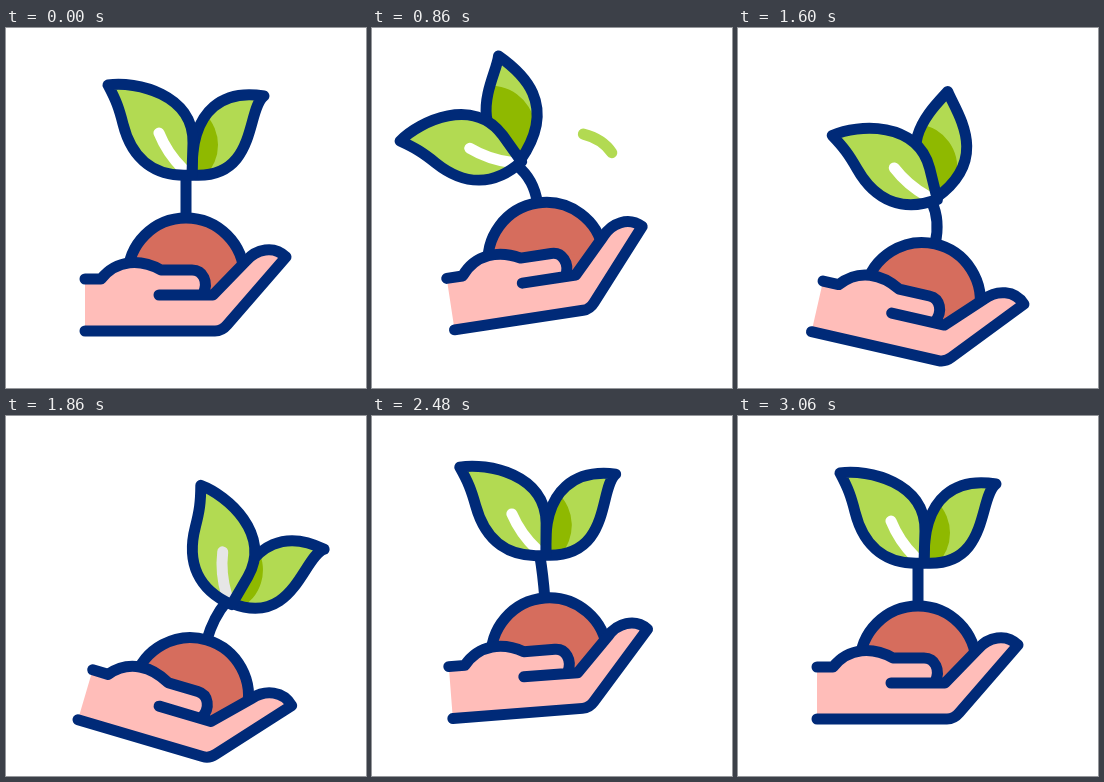
Animation of 360 by 360 pixels, one loop 3600 ms. Source, as an HTML page:

```html
<!DOCTYPE html>
<html lang="en">
<head>
<meta charset="utf-8">
<title>Sprout in hand</title>
<style>
  html, body { margin: 0; width: 100%; height: 100%; overflow: hidden; background: #fff; }
  svg { display: block; width: 100vw; height: 100vh; }
  .line { fill: none; stroke: #002a78; stroke-width: 11; stroke-linecap: round; stroke-linejoin: round; }
  .glint { fill: none; stroke-width: 11; stroke-linecap: round; }
</style>
</head>
<body>
<svg viewBox="0 0 360 360">
  <defs>
    <path id="leftLeaf" d="M102 57C130 53 188 66 187 115L186 147C150 150 126 132 117 96C113 80 110 72 102 57Z"/>
    <path id="rightLeaf"/>
    <clipPath id="inLeft"><use href="#leftLeaf"/></clipPath>
    <clipPath id="inRight"><use href="#rightLeaf"/></clipPath>
  </defs>

  <path id="spark" class="glint" stroke="#b2da52" d="M-17 1Q2 -5 17 2"/>

  <path id="stem" class="line"/>
  <g id="right">
    <use href="#rightLeaf" fill="#b2da52"/>
    <g clip-path="url(#inRight)"><circle id="shade" fill="#8fb900"/></g>
    <use href="#rightLeaf" class="line"/>
  </g>
  <g id="left">
    <use href="#leftLeaf" fill="#b2da52"/>
    <g clip-path="url(#inLeft)"><path id="glint" class="glint" d="M153 105Q161 125 177 141"/></g>
    <use href="#leftLeaf" class="line"/>
  </g>

  <g id="hand">
    <path class="line" d="M122 248A58 58 0 0 1 238 248" style="fill:#d66d5d"/>
    <path fill="#d66d5d" d="M128 246H234L207 270H150Z"/>
    <path fill="#ffbdb9" d="M79 251H95C111 231 135 231 155 242H186C197 242 201 252 197 267H207L240 233C250 221 268 217 280 229L221 297Q216 303 209 303H79Z"/>
    <path class="line" d="M79 251H95C111 231 135 231 155 242H186C197 242 203 254 197 266M153 267H207L240 233C250 221 268 217 280 229L221 297Q216 303 209 303H79"/>
  </g>
</svg>
<script>
const LOOP = 3600;
const PIVOT = { x: 73, y: 279 };
const BASE = { x: 180, y: 190 };
const STEM = 42;

// Each track: [time, angle] pairs, eased between neighbours.
const tracks = {
  hand:  [[400, 0], [1000, -10], [1800, 17], [2440, -4.5], [3060, 0]],
  stem:  [[400, 0], [1180, -45], [2000, 33], [2580, -10], [3060, 0]],
  left:  [[400, 0], [1220, -63], [2020, 39], [2580, -5], [3060, 0]],
  right: [[400, 0], [1220, -91], [2045, 33], [2580, -5], [3060, 0]]
};

// Right leaf: end points and the curve handles of both edges.
const ROOT = [186, 147], TIP = [258, 68];
const UPPER = [[222, 62], [184, 76]];
const LOWER = [[240, 80], [252, 152]];

const el = id => document.getElementById(id);
const set = (id, attrs) => {
  for (const k in attrs) el(id).setAttribute(k, attrs[k]);
};
const clamp = (v, lo, hi) => Math.min(hi, Math.max(lo, v));
const ease = u => u * u * (3 - 2 * u);

function sample(keys, t) {
  let v = keys[0][1];
  for (let i = 1; i < keys.length; i++) {
    const [t0, a] = keys[i - 1], [t1, b] = keys[i];
    if (t >= t0) v = a + (b - a) * ease(clamp((t - t0) / (t1 - t0), 0, 1));
  }
  return v;
}

function turn(x, y, deg) {
  const r = deg * Math.PI / 180, c = Math.cos(r), s = Math.sin(r);
  return { x: x * c - y * s, y: x * s + y * c };
}

// Mirrors a point across the line from the leaf's root to its tip.
function mirror([x, y]) {
  const ax = TIP[0] - ROOT[0], ay = TIP[1] - ROOT[1];
  const k = 2 * ((x - ROOT[0]) * ax + (y - ROOT[1]) * ay) / (ax * ax + ay * ay);
  return [2 * ROOT[0] - x + k * ax, 2 * ROOT[1] - y + k * ay];
}

// flip 0 is the resting leaf, 1 its mirror image.
function leafPath(flip) {
  const blend = (from, to) => from.map((p, i) => {
    const q = mirror(to[i]);
    return p.map((v, j) => v + (q[j] - v) * flip);
  });
  const [u1, u2] = blend(UPPER, LOWER);
  const [l1, l2] = blend(LOWER, UPPER);
  return `M${TIP}C${u1} ${u2} ${ROOT}C${l2} ${l1} ${TIP}Z`;
}

function draw(t) {
  const hand = sample(tracks.hand, t);
  const left = sample(tracks.left, t);
  const right = sample(tracks.right, t);

  const arm = turn(BASE.x - PIVOT.x, BASE.y - PIVOT.y, hand);
  const root = { x: PIVOT.x + arm.x, y: PIVOT.y + arm.y };
  const up = turn(0, -STEM, sample(tracks.stem, t));
  const bend = turn(0, -24, hand);
  const top = { x: root.x + up.x, y: root.y + up.y };
  const place = deg => `translate(${top.x} ${top.y}) rotate(${deg}) translate(-180 -148)`;

  set('hand', { transform: `rotate(${hand} ${PIVOT.x} ${PIVOT.y})` });
  set('stem', { d: `M${root.x} ${root.y}Q${root.x + bend.x} ${root.y + bend.y} ${top.x} ${top.y}` });
  set('left', { transform: place(left) });
  set('right', { transform: place(right) });
  set('rightLeaf', { d: leafPath(clamp(-right / 80, 0, 1)) });

  // The shade slides across the leaf as it tilts.
  const slide = right * (right > 0 ? 0.25 : 0.48);
  set('shade', {
    cx: 168 - slide,
    cy: 117 + slide * 0.45,
    r: 44 + Math.max(0, -right - 55) * 0.7
  });

  const grey = 255 - clamp(left, 0, 31) * 0.87;
  set('glint', { stroke: `rgb(${grey},${grey},${grey})` });

  // The fleck is left behind when the leaf swings away.
  const shown = t > 400 && t < 1000;
  const size = 1 - ease(clamp((t - 880) / 120, 0, 1));
  set('spark', {
    visibility: shown ? 'visible' : 'hidden',
    transform: `translate(${235 + right * 0.16} ${106 - right * 0.15}) rotate(${106 + right * 1.38}) scale(${size})`
  });
}

const start = performance.now();
function frame() {
  draw((performance.now() - start) % LOOP);
  requestAnimationFrame(frame);
}
draw(0);
requestAnimationFrame(frame);
</script>
</body>
</html>
```
